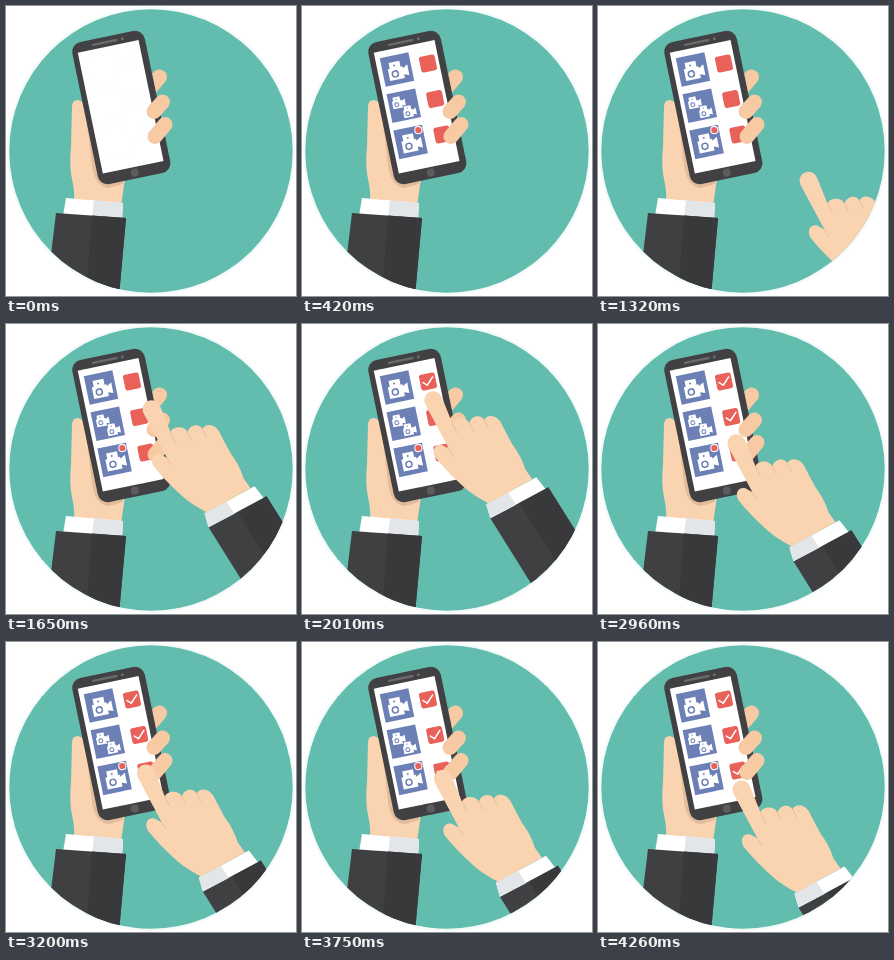
An HTML page for the animation above (4.79 s loop, 290 by 290 pixels).

```html
<!DOCTYPE html>
<html lang="en">
<head>
<meta charset="utf-8">
<title>Checklist on a phone</title>
<style>
  html, body { margin: 0; width: 100%; height: 100%; overflow: hidden; background: #fff; }
  svg { display: block; width: 100%; height: 100%; }
  .skin { fill: #fad3b1; }
  .shade { fill: #e3bd9b; }
  .crease { fill: none; stroke: #ecbf98; stroke-width: 1; stroke-linecap: round; }
  .finger { fill: none; stroke: #f7caa4; stroke-width: 15; stroke-linecap: round; }
  .tick { fill: none; stroke: #fff; stroke-width: 1.5; stroke-linecap: round; stroke-linejoin: round; }
</style>
</head>
<body>
<svg viewBox="0 0 290 290">
  <defs>
    <clipPath id="disc"><circle cx="145" cy="145" r="141.700"/></clipPath>
    <g id="device">
      <path fill="#fff" d="M-7-8H4v6h2v2l5-3v11l-5-2v4H-9V-2h2z"/>
      <circle cx="-2" cy="-4.500" r="1" fill="#6c80b6"/>
      <circle cx="-2.500" cy="4" r="3" fill="#fff" stroke="#6c80b6" stroke-width="1.500"/>
    </g>
  </defs>
  <circle cx="145" cy="145" r="144" fill="#f4faf9"/>
  <circle cx="145" cy="145" r="141.700" fill="#63bdaf"/>
  <g clip-path="url(#disc)">
    <!-- holding hand -->
    <path class="skin" d="M66 101Q66 94 72 94Q78 95 80 104L90 150L119 172L115 200L68 196Q69 186 66 173Q63 160 65 140Z"/>
    <path class="shade" d="M80 108L86 160Q89 181 103 182L117 178V170L90 160Z"/>
    <path fill="#fff" d="M60 192L117 197L116 214L57 210Z"/>
    <path fill="#e3e6e8" d="M88 194.500L117 197L116 214L86 212Z"/>
    <path fill="#403f41" d="M50 207L120 212L113 290L40 290Z"/>
    <path fill="#39383a" d="M86 209.500L120 212L113 290L80 290Z"/>
    <path class="finger" stroke-width="14" d="M144 82L153.500 71"/>
    <!-- phone -->
    <g transform="translate(115 100) rotate(-11.700)">
      <rect x="-37" y="-71" width="74" height="145" rx="10" fill="#414042"/>
      <rect x="-31.500" y="-61" width="62" height="123.500" fill="#fff"/>
      <path d="M-15-65.500h24" stroke="#6a696b" stroke-width="2.400" stroke-linecap="round"/>
      <circle cx="15" cy="-65.500" r="1.500" fill="#6a696b"/>
      <circle cx="0" cy="68" r="4" fill="#5d5c5e"/>
    </g>
    <g id="rows"></g>
    <path class="finger" d="M148 105.500L156.500 96M149 130.500L159 118.500"/>
    <!-- pointing hand, fingertip at the origin -->
    <g id="hand">
      <path fill="#403f41" d="M57 118L115 87L185 199L127 230Z"/>
      <path fill="#39383a" d="M86 102.500L115 87L185 199L156 215Z"/>
      <path fill="#fff" d="M53 104L103 77L112 88.500L57 118Z"/>
      <path fill="#e3e6e8" d="M53 104L75 92L83 104.500L57 118Z"/>
      <path class="skin" d="M-8 4C-11-3-6-9 0-9C5-9 7-6 9-2L19 23
        C21 17 33 16 36 23C38 15 48 14 51 20C54 13 65 15 69 25
        Q73 33 79 44Q88 56 92 69L99 79L55 103
        Q40 95 32 88Q14 72 2 57C-2 50 2 43 9 45L16 49Z"/>
      <path class="crease" d="M19 23L24 33M36 23L40 31M51 20L55 28M16 49L20 56"/>
    </g>
  </g>
</svg>
<script>
  const LOOP = 4790, FADE = 420, ENTER = 1080;
  const NS = 'http://www.w3.org/2000/svg';
  const rows = document.getElementById('rows');
  const hand = document.getElementById('hand');

  // Fingertip moves at constant speed: start, end, from, to
  const moves = [
    [ENTER, 1740, [258, 240], [128, 61]],
    [1740, 2400, [128, 61], [136, 98]],
    [2540, 3230, [136, 98], [140, 133]],
    [3570, 4260, [140, 133], [143.5, 147.5]]
  ];
  const tickTimes = [1740, 2540, 3570];

  function tilted(x, y, body) {
    const g = document.createElementNS(NS, 'g');
    g.setAttribute('transform', `translate(${x} ${y}) rotate(-11.7)`);
    g.innerHTML = body;
    rows.append(g);
    return g;
  }

  const tile = '<rect x="-14.6" y="-14.6" width="29.2" height="29.2" fill="#6c80b6"/>';
  const device = '<use href="#device"/>';
  const icons = [
    device,
    '<use href="#device" transform="translate(-5 -5) scale(.65)"/>' +
      '<use href="#device" transform="translate(4 6) scale(.65)"/>',
    device + '<circle cx="10" cy="-10" r="3.6" fill="#e8625a" stroke="#fff"/>'
  ];
  const ticks = icons.map((icon, i) => {
    tilted(95 + 6.8 * i, 63.5 + 36.2 * i, tile + icon);
    const box = tilted(126 + 7.2 * i, 57.5 + 35.5 * i,
      '<rect x="-8" y="-8" width="16" height="16" rx="2.5" fill="#e8625a"/>' +
      '<path class="tick" d="M-5 0L-1.500 3.500L5.500-3.500"/>');
    return box.lastChild;
  });

  function tipAt(t) {
    const [start, end, a, b] = moves.findLast(m => t >= m[0]) || moves[0];
    const p = Math.min(1, Math.max(0, (t - start) / (end - start)));
    return a.map((v, i) => v + (b[i] - v) * p);
  }

  function draw(t) {
    rows.setAttribute('opacity', Math.min(1, t / FADE));
    ticks.forEach((tick, i) => tick.setAttribute('opacity', t >= tickTimes[i] ? 1 : 0));
    hand.setAttribute('visibility', t >= ENTER ? 'visible' : 'hidden');
    hand.setAttribute('transform', `translate(${tipAt(t)})`);
  }

  const begin = performance.now();
  function play() {
    draw((performance.now() - begin) % LOOP);
    requestAnimationFrame(play);
  }
  draw(0);
  requestAnimationFrame(play);
</script>
</body>
</html>
```
